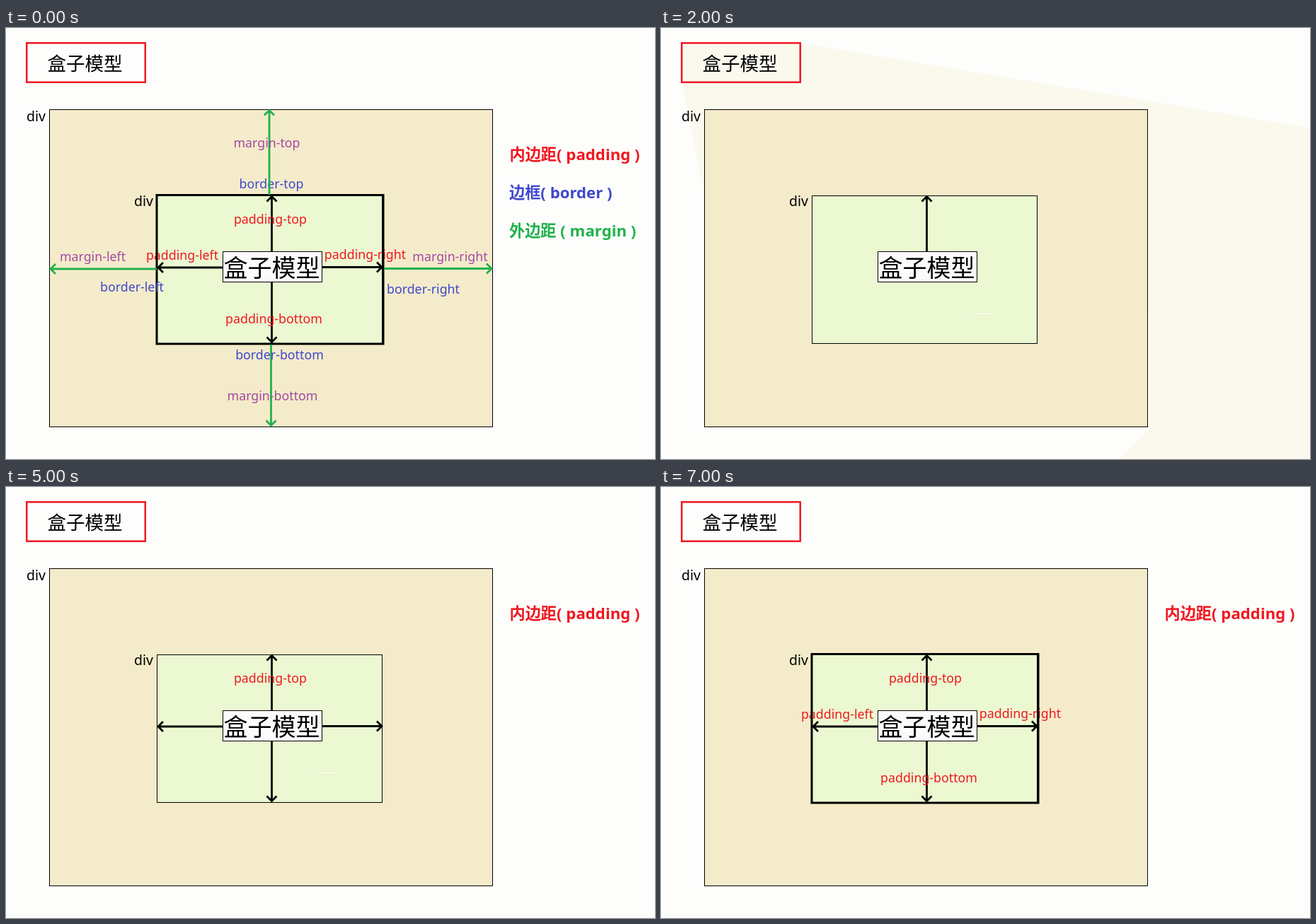
These frames come from a looping animation (917x610 px, 8000 ms). An HTML page:

```html
<!DOCTYPE html>
<html lang="zh-CN">
<head>
<meta charset="utf-8">
<title>盒子模型</title>
<style>
html, body { margin: 0; width: 100%; height: 100%; overflow: hidden; background: #fdfefc; }
svg { display: block; width: 917px; height: 610px; }
text { font-family: "Noto Sans", "Noto Sans CJK SC", "Noto Sans CJK", sans-serif; }
.label { font-size: 17.8px; text-anchor: middle; }
.legend { font-size: 22.2px; font-weight: 700; }
.cjk { font-family: "Noto Sans CJK SC", "Noto Sans CJK", sans-serif; text-anchor: middle; }
.div { font-size: 19.5px; }
</style>
</head>
<body>
<svg id="stage" viewBox="0 0 917 610"></svg>
<script>
const NS = "http://www.w3.org/2000/svg";
const stage = document.getElementById("stage");
const LOOP = 8000;
const RED = "#f01820", BLUE = "#3f48cc", PURPLE = "#a349a4", GREEN = "#22b14c";
const parts = [];

// Each part is visible while show(t) holds; without show it always is.
function add(tag, attrs, show, content) {
  const el = document.createElementNS(NS, tag);
  for (const k in attrs) el.setAttribute(k, attrs[k]);
  if (content) el.textContent = content;
  stage.appendChild(el);
  if (show) parts.push({ el, show });
}

const full = t => t < 1000;
const from = start => t => full(t) || t >= start;
const between = (a, b) => t => t >= a && t < b;

function rect(x, y, width, height, fill, stroke, sw, show) {
  add("rect", { x, y, width, height, fill, stroke, "stroke-width": sw }, show);
}

function arrow(x1, y1, x2, y2, color, show) {
  const dx = Math.sign(x2 - x1), dy = Math.sign(y2 - y1), s = 7;
  const bx = x2 - dx * s, by = y2 - dy * s;
  const head = `M${bx - dy * s} ${by - dx * s}L${x2} ${y2}L${bx + dy * s} ${by + dx * s}`;
  add("path", { d: `M${x1} ${y1}L${x2} ${y2}${head}`, fill: "none", stroke: color, "stroke-width": 2.8 }, show);
}

function text(cls, x, y, content, fill, show, size) {
  const attrs = { class: cls, x, y, fill };
  if (size) attrs["font-size"] = size;
  add("text", attrs, show, content);
}

// Background tint
add("path", { d: "M29 21H197L917 141V610H648L690 568V400H100L61 235L29 78Z", fill: "#fbf9ee" }, between(1000, 3000));

rect(29.25, 21.25, 167.5, 55.5, "none", RED, 2.5);
text("cjk", 111.5, 59.5, "盒子模型", "#000", null, 26.5);

rect(61.5, 115.5, 626, 449, "#f4ebca", "#000", 1);
rect(213.5, 237.5, 318, 209, "#ebf8d1", "#000", 1);
text("div", 29, 132, "div", "#000");
text("div", 181, 252, "div", "#000");
add("path", { d: "M443 404.5H467", stroke: "#fbfdf5" }, between(1000, 6000));

// Padding
arrow(375.5, 316, 375.5, 238.5, "#000", from(2000));
arrow(375.5, 360, 375.5, 444.5, "#000", from(4000));
arrow(306, 339, 215, 339, "#000", from(4000));
arrow(447, 338.5, 531, 338.5, "#000", from(4000));
text("label", 373.5, 277, "padding-top", RED, from(5000));
text("label", 249, 328, "padding-left", RED, from(6000));
text("label", 507.5, 327, "padding-right", RED, from(6000));
text("label", 378.5, 418, "padding-bottom", RED, from(6000));
text("legend", 711.5, 187, "内边距( padding )", RED, from(3000));

// Border
rect(213, 236.5, 320, 210.5, "none", "#000", 3, from(7000));
text("label", 375, 227, "border-top", BLUE, full);
text("label", 178, 373, "border-left", BLUE, full);
text("label", 589.5, 376, "border-right", BLUE, full);
text("legend", 711, 241, "边框( border )", BLUE, full);

// Margin
arrow(372, 236, 372, 116.5, GREEN, full);
arrow(374.5, 448, 374.5, 562.5, GREEN, full);
arrow(213, 341, 63, 341, GREEN, full);
arrow(534, 340.5, 686, 340.5, GREEN, full);
text("label", 386.5, 469, "border-bottom", BLUE, full);
text("label", 368.5, 169, "margin-top", PURPLE, full);
text("label", 122.5, 330, "margin-left", PURPLE, full);
text("label", 627.5, 330, "margin-right", PURPLE, full);
text("label", 376.5, 527, "margin-bottom", PURPLE, full);
text("legend", 711, 295, "外边距 ( margin )", GREEN, full);

// Content
rect(306.5, 316.5, 140, 43, "#fdfafd", "#000", 1);
text("cjk", 375.5, 351.5, "盒子模型", "#000", null, 34);

function draw(t) {
  for (const { el, show } of parts) el.style.display = show(t) ? "" : "none";
}

const start = performance.now();
function tick(now) {
  draw(Math.max(0, now - start) % LOOP);
  requestAnimationFrame(tick);
}
draw(0);
requestAnimationFrame(tick);
</script>
</body>
</html>
```
